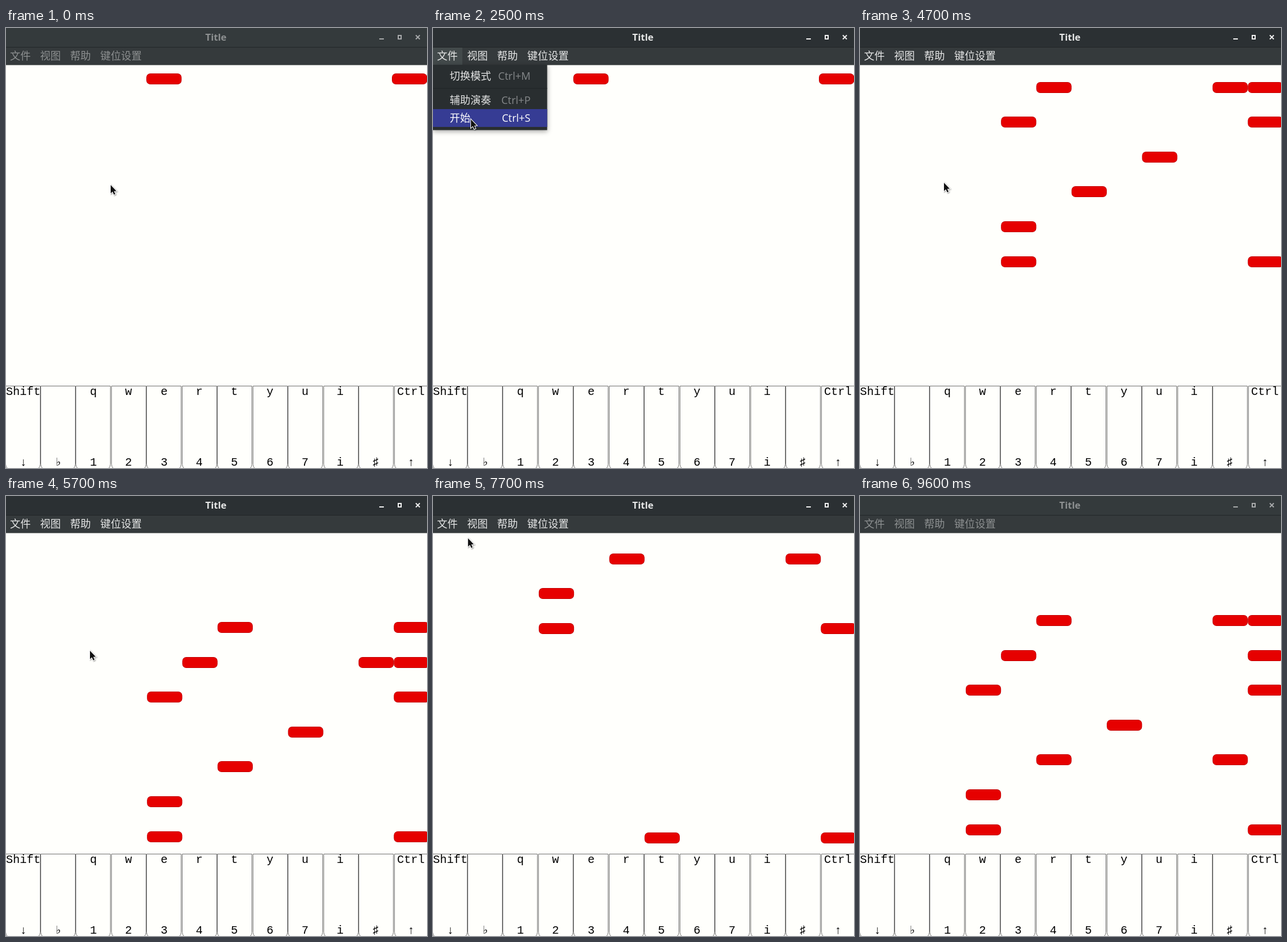
These frames come from a looping animation (732x765 px, 9700 ms). An HTML page with a canvas:

```html
<!DOCTYPE html>
<html lang="zh">
<head>
<meta charset="utf-8">
<title>Title</title>
<style>
  html, body { margin: 0; width: 100%; height: 100%; overflow: hidden; background: #fffffc; }
  canvas { display: block; }
</style>
</head>
<body>
<canvas id="stage" width="732" height="765"></canvas>
<script>
const ctx = document.getElementById('stage').getContext('2d');
const W = 732, H = 765, LOOP = 9700, STEP = 100;
const PAPER = '#fffffc';
const UI = '"Open Sans", "Noto Sans CJK SC", "Noto Sans CJK", sans-serif';
const CJK = '"Noto Sans CJK SC", "Noto Sans CJK", sans-serif';
const MONO = '"Liberation Mono", "DejaVu Sans Mono", monospace';

const FOCUS = 1300, BLUR = 9400;
const MENU_OPEN = 1400, START = 3100, POINTER_OUT = 7900;
const ROW_GAP = 60.6, ROW_END = 632;
const PITCH = 61.3, BAR = 12;
const FLAT = 10, OCTAVE = 11;

const topLabels = ['Shift', '', ...'qwertyui', '', 'Ctrl'];
const bottomLabels = [...'↓♭1234567i♯↑'];
const phrase = [...'0024012'].map(Number);

// Few points of the slightly uneven scroll: time, centre of the first row.
const scroll = [
  { t: 3000, y: 88.5 }, { t: 4700, y: 406 }, { t: 5700, y: 592 },
  { t: 6900, y: 809 }, { t: 8500, y: 1106.2 }, { t: 9600, y: 1307.2 }
];

// Pointer glides to each stop between two times.
const pointerStart = { x: 182, y: 273 };
const glides = [
  { from: 300, to: 900, x: 21, y: 71 },
  { from: 1000, to: 1300, x: 22, y: 50 },
  { from: 1700, to: 2500, x: 66, y: 159 },
  { from: 3000, to: 4000, x: 146, y: 269 },
  { from: 6400, to: 6900, x: 138, y: 257 },
  { from: 7100, to: 7800, x: 48, y: 43 }
];

const clamp01 = v => Math.min(1, Math.max(0, v));
const mix = (a, b, k) => a + (b - a) * k;

function pointerAt(t) {
  let { x, y } = pointerStart;
  for (const g of glides) {
    const k = clamp01((t - g.from) / (g.to - g.from));
    x = mix(x, g.x, k);
    y = mix(y, g.y, k);
  }
  return { x, y };
}

function scrollAt(t) {
  let y = scroll[0].y;
  for (let i = 1; i < scroll.length; i++) {
    const a = scroll[i - 1], b = scroll[i];
    y += (b.y - a.y) * clamp01((t - a.t) / (b.t - a.t));
  }
  return y;
}

function rect(x, y, w, h, color) {
  ctx.fillStyle = color;
  ctx.fillRect(x, y, w, h);
}

function text(str, x, y, font, color, align = 'left') {
  ctx.font = font;
  ctx.fillStyle = color;
  ctx.textAlign = align;
  ctx.fillText(str, x, y);
}

// The same phrase each bar, one degree lower; the fourth degree is sharpened.
function columnsOf(row) {
  const bar = Math.floor(row / BAR), beat = row % BAR;
  if (beat >= phrase.length) return [];
  const col = 4 - bar + phrase[beat];
  const cols = [col];
  if (col === 5) cols.push(FLAT);
  if (beat === 0 || beat > 3) cols.push(OCTAVE);
  return cols;
}

function drawNote(x, y) {
  const top = Math.round(y - 9.5);
  ctx.beginPath();
  ctx.roundRect(x, top, PITCH, 19, 7);
  ctx.fillStyle = '#b80000';
  ctx.fill();
  ctx.beginPath();
  ctx.roundRect(x + 0.7, top + 0.7, PITCH - 1.4, 17.6, 6.4);
  ctx.fillStyle = '#e60000';
  ctx.fill();
}

function drawNotes(t) {
  const first = scrollAt(t);
  const pitch = t < START ? 61 : PITCH;
  for (let row = 0; row < 2 * BAR - 5; row++) {
    const y = first - row * ROW_GAP;
    if (y < 50 || y > ROW_END) continue;
    for (const c of columnsOf(row)) drawNote(pitch * c, y);
  }
}

function drawLabel(str, i, y) {
  const x = Math.floor(PITCH * i + 30 - 6 * str.length);
  text(str, x, y, '20px ' + MONO, '#000');
}

function drawKeys() {
  ctx.lineWidth = 1;
  for (let i = 0; i < 12; i++) {
    // Whole-pixel keys leave a gap at every second border.
    const x = Math.max(-1, 61 * i + Math.floor((i - 3) / 2));
    ctx.beginPath();
    ctx.roundRect(x + 0.5, 622.5, 60, 146, [0, 0, 10, 10]);
    ctx.fillStyle = PAPER;
    ctx.fill();
    ctx.strokeStyle = '#707070';
    ctx.stroke();
    drawLabel(topLabels[i], i, 638);
    drawLabel(bottomLabels[i], i, 761);
  }
}

function drawButtons(color) {
  rect(649, 18, 8, 2, color);
  ctx.strokeStyle = color;
  ctx.lineWidth = 2;
  ctx.strokeRect(682, 13, 5, 6);
  ctx.lineWidth = 1.8;
  ctx.beginPath();
  ctx.moveTo(712.5, 12.5);
  ctx.lineTo(719.5, 19.5);
  ctx.moveTo(719.5, 12.5);
  ctx.lineTo(712.5, 19.5);
  ctx.stroke();
}

function drawBars(focused, menuOpen) {
  const ink = focused ? '#e6e7e7' : '#8d9091';
  rect(0, 0, W, 33, focused ? '#2b3033' : '#343a3c');
  rect(0, 33, W, 1, '#222628');
  rect(0, 34, W, 30.5, '#353a3c');
  text('Title', 365, 22.3, 'bold 16.7px ' + UI, ink, 'center');
  drawButtons(focused ? '#f2f2f2' : '#a8aaab');
  if (menuOpen) rect(0, 34, 51, 30, '#434a4b');
  let x = 7;
  for (const label of ['文件', '视图', '帮助', '键位设置']) {
    text(label, x, 55, '18px ' + CJK, ink);
    x += 18 * label.length + 16.3;
  }
}

function drawMenu(pointerY) {
  const itemH = 31, width = 198.5;
  ctx.save();
  ctx.shadowColor = 'rgba(0,0,0,.35)';
  ctx.shadowBlur = 8;
  ctx.shadowOffsetY = 2;
  rect(0, 64, width, 113.5, '#292e30');
  ctx.restore();
  rect(0, 104.5, width, 1, '#212527');
  let top = 68;
  for (const [label, key] of [['切换模式', 'M'], ['辅助演奏', 'P'], ['开始', 'S']]) {
    const hot = pointerY >= top && pointerY < top + itemH;
    if (hot) rect(0, top, width, itemH, '#363c94');
    text(label, 29, top + 22, '18px ' + CJK, hot ? '#fff' : '#e2e3e3');
    text('Ctrl+' + key, 169.5, top + 22, '18px ' + UI, hot ? '#fff' : '#85888a', 'right');
    top += itemH;
    if (key === 'M') top += 11;
  }
}

function drawPointer({ x, y }) {
  ctx.save();
  ctx.translate(x, y);
  const shape = new Path2D('M0 0V14.5L3.3 11.5 5.7 16.8 8 15.7 5.7 10.7 10 10.4Z');
  ctx.shadowColor = 'rgba(0,0,0,.4)';
  ctx.shadowBlur = 2;
  ctx.shadowOffsetX = ctx.shadowOffsetY = 1;
  ctx.lineWidth = 2;
  ctx.strokeStyle = '#fff';
  ctx.stroke(shape);
  ctx.shadowColor = 'transparent';
  ctx.fillStyle = '#111';
  ctx.fill(shape);
  ctx.restore();
}

function draw(t) {
  const pointer = pointerAt(t);
  const menuOpen = t >= MENU_OPEN && t < START;
  rect(0, 0, W, H, PAPER);
  drawNotes(t);
  drawKeys();
  drawBars(t >= FOCUS && t < BLUR, menuOpen);
  if (menuOpen) drawMenu(pointer.y);
  if (t < POINTER_OUT) drawPointer(pointer);
}

const begin = performance.now();
function loop() {
  const t = (performance.now() - begin) % LOOP;
  draw(Math.floor(t / STEP) * STEP);
  requestAnimationFrame(loop);
}
loop();
</script>
</body>
</html>
```
